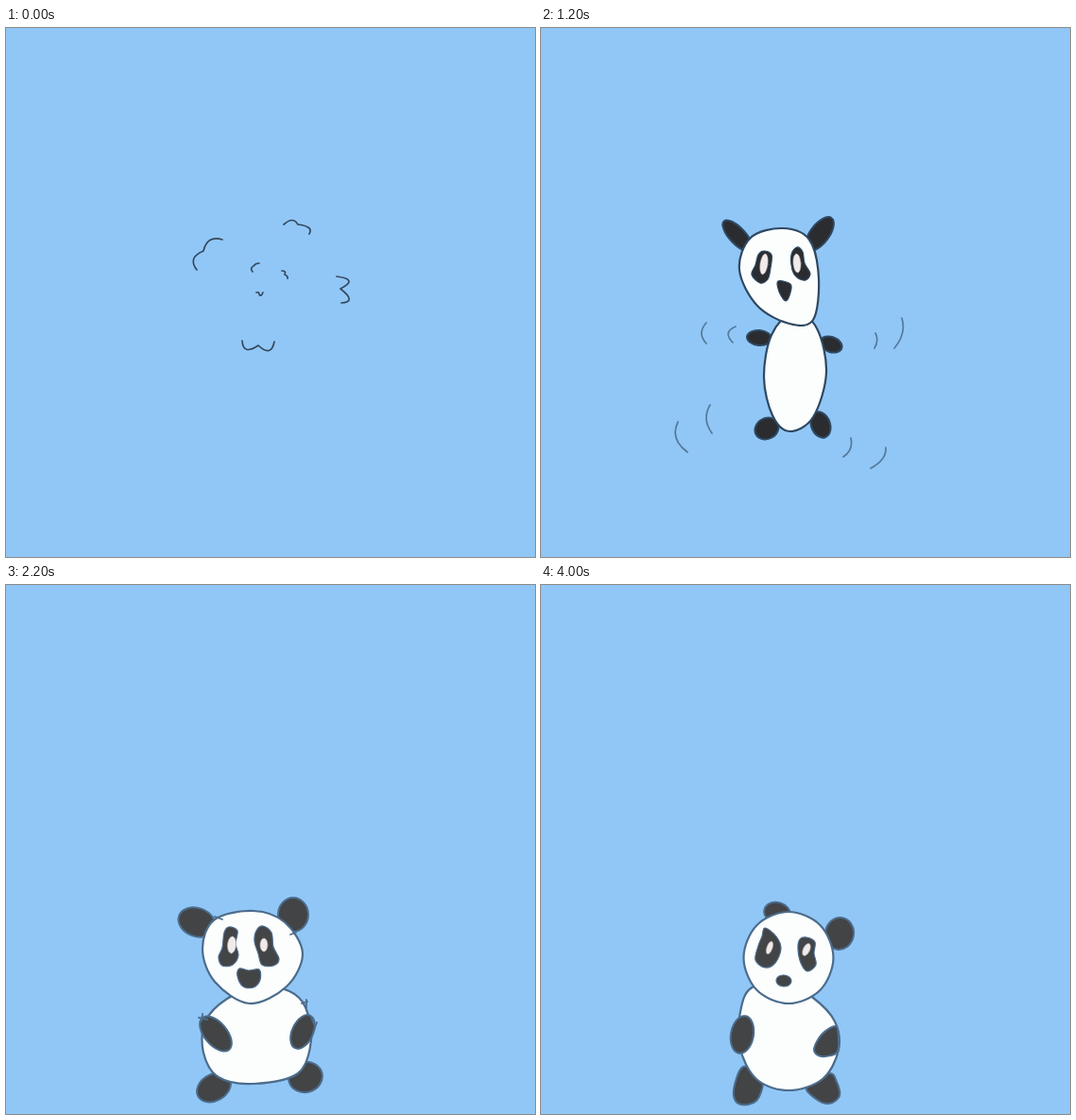
An HTML page that plays this animation: 560x560 px, repeating every 5400 ms.

```html
<!DOCTYPE html>
<html lang="en">
<head>
<meta charset="utf-8">
<title>Falling panda</title>
<style>
  html, body { margin: 0; width: 100%; height: 100%; overflow: hidden; background: #91c7f6; }
  svg { display: block; width: 100vw; height: 100vh; }
  path { stroke-linecap: round; stroke-linejoin: round; }
</style>
</head>
<body>
<svg id="stage" viewBox="0 0 560 560"></svg>
<script>
const LOOP = 5400;
const stage = document.getElementById('stage');

// Parts with five values are ellipses (cx, cy, rx, ry, degrees); others are outline points.
const floating = {
  ink: [46, 72, 98], dark: [44, 45, 48],
  earL: [204, 129, 17, 20, -25], earR: [301, 127, 20, 16, -30],
  armL: [214, 238, 19, 11, 12], armR: [319, 228, 17, 11, -55],
  footL: [234, 317, 14, 12, -40], footR: [303, 322, 15, 16, 0],
  body: [268,205, 303,214, 316,255, 302,305, 268,332, 236,309, 224,265, 235,226],
  head: [255,122, 294,134, 316,172, 301,207, 258,223, 213,209, 195,172, 213,137],
  eyeL: [231,142, 239,150, 237,165, 236,178, 227,183, 215,176, 217,161, 223,148],
  eyeR: [268,140, 277,144, 281,157, 291,168, 285,178, 273,176, 265,165, 262,148],
  pupilL: [229, 161, 4, 9, 0], pupilR: [274, 158, 4, 8, -5],
  nose: [250,182, 267,182, 265,191, 254,193, 249,187],
  marks: 'M215 140Q224 125 241 122'
};
const falling = {
  ink: [46, 72, 98], dark: [43, 44, 47],
  earL: [208, 220, 21, 8.5, 47], earR: [295, 218, 21, 10, -53],
  armL: [231, 328, 13, 8, 5], armR: [307, 335, 12, 8, 20],
  footL: [239, 424, 13, 11, -30], footR: [296, 420, 10, 14, -20],
  body: [268,300, 292,318, 302,365, 288,412, 263,427, 245,410, 236,370, 244,325],
  head: [256,212, 284,224, 294,265, 288,309, 263,313, 229,294, 210,256, 222,222],
  eyeL: [236,236, 244,240, 243,254, 240,266, 232,270, 223,261, 227,251, 230,240],
  eyeR: [271,232, 277,237, 279,249, 285,260, 280,267, 271,264, 266,256, 265,240],
  pupilL: [236, 250, 4, 11, 8], pupilR: [271, 249, 4, 10, -4],
  nose: [251,268, 264,271, 264,280, 259,289, 252,279]
};
const stretched = {
  ink: [72, 102, 133], dark: [67, 68, 70],
  earL: [224, 279, 21, 9, 58], earR: [290, 284, 21, 10, -62],
  armL: [228, 415, 14, 11, 10], armR: [309, 408, 17, 14, -50],
  footL: [223, 492, 13, 10, 5], footR: [302, 498, 13, 14, 0],
  body: [268,388, 291,404, 302,450, 290,508, 257,526, 237,505, 232,460, 242,405],
  head: [260,285, 289,306, 298,345, 290,381, 259,395, 230,380, 222,340, 235,302],
  eyeL: [242,308, 251,312, 253,325, 248,342, 240,346, 234,338, 236,324, 238,312],
  eyeR: [270,309, 276,315, 280,327, 285,336, 278,343, 268,340, 264,327, 265,312],
  pupilL: [243, 322, 3, 6, 0], pupilR: [272, 324, 3, 7, -5],
  nose: [252,348, 268,349, 268,360, 263,370, 252,361]
};
const sitting = {
  ink: [76, 108, 140], dark: [67, 68, 70], armsInFront: true,
  earL: [202, 357, 20, 15, 20], earR: [304, 349, 16, 18, 0],
  armL: [222, 475, 22, 12, 50], armR: [314, 473, 19, 11, -65],
  footL: [220, 532, 19, 14, -30], footR: [317, 521, 18, 16, -15],
  body: [268,425, 300,430, 317,447, 323,482, 309,517, 262,528, 225,521, 209,495, 211,462, 234,438],
  head: [262,345, 295,357, 314,390, 297,425, 258,443, 221,420, 208,385, 221,354],
  eyeL: [236,362, 245,366, 243,380, 246,392, 240,402, 229,403, 225,394, 229,384, 231,368],
  eyeR: [272,361, 281,368, 283,383, 289,396, 283,403, 271,402, 267,390, 263,377, 265,366],
  pupilL: [239, 381, 4.5, 9, 5], pupilR: [273, 381, 4, 7, 0],
  nose: [247,406, 257,408, 268,407, 269,418, 262,426, 251,425, 245,414]
};
const ticks = 'M313 443l6-2M318 439v8M323 457l3 8M329 463l-4 11M204 458l9 2M208 454l-1 8M221 351l8 3M301 370l6-2';
const turned = {
  ink: [76, 108, 140], dark: [67, 68, 70], armsInFront: true,
  earL: [250, 347, 14, 11, 15], earR: [316, 369, 15, 17, 10],
  armL: [213, 476, 12, 20, 10], armR: [312,467, 315,480, 313,495, 297,499, 289,492, 297,476],
  footL: [214,510, 228,513, 235,527, 228,546, 212,550, 204,541, 207,522],
  footR: [305,517, 313,526, 316,541, 305,549, 291,544, 281,531],
  body: [255,420, 288,437, 311,462, 315,492, 298,523, 262,535, 228,523, 210,488, 211,452, 222,427],
  head: [262, 394.5, 47.5, 48.5, 0],
  eyeL: [237,363, 249,372, 254,385, 248,400, 237,405, 227,397, 230,382, 234,372],
  eyeR: [281,373, 290,378, 289,390, 291,402, 282,409, 275,400, 272,385, 274,375],
  pupilL: [242, 384, 3, 7, 20], pupilR: [281, 386, 3.5, 7, 25],
  nose: [257, 419, 8, 6, 5]
};

// Each puff is two arcs: start, bend, cusp, bend, end.
const nearPuffs = [
  [202,256, 192,243, 209,236, 213,219, 229,224], [294,208, 304,199, 309,208, 326,210, 321,218],
  [350,263, 374,266, 354,276, 372,290, 355,291], [250,331, 251,347, 267,336, 281,349, 284,332],
  [261,258, 258,254, 262,252, 264,249, 268,249], [292,257, 297,257, 295,261, 299,263, 298,265],
  [265,280, 268,279, 268,282, 270,285, 272,280]
];
const farPuffs = [
  [256,56, 280,23, 325,54, 400,43, 415,87], [94,123, 22,127, 42,182, 3,215, 29,267],
  [493,181, 548,190, 519,230, 563,268, 530,294], [46,435, -5,499, 52,507, 57,550, 126,545],
  [532,438, 534,500, 491,510, 507,551, 407,540], [114,209, 105,189, 132,184, 135,173, 145,173],
  [393,195, 420,192, 415,214, 434,228, 424,246], [82,310, 78,330, 87,332, 82,350, 108,362],
  [151,315, 150,320, 154,321, 154,328, 164,334], [354,298, 362,297, 363,308, 367,312, 365,318],
  [450,349, 464,351, 457,368, 465,383, 458,392], [218,419, 226,425, 231,422, 247,431, 252,424],
  [357,452, 361,467, 346,465, 339,463, 332,469], [148,469, 158,478, 170,476, 185,497, 209,483]
];
const nearBox = [198, 203, 363, 341], farBox = [17, 36, 546, 547];
const sittingBox = [182, 331, 335, 548], turnedBox = [199, 336, 331, 550];
const speedLines = 'M175 312Q165 323 175 334M206 316Q192 322 203 333M145 417Q136 435 155 449' +
  'M179 399Q170 414 181 429M382 307Q387 324 374 339M354 323Q358 331 353 339' +
  'M328 434Q331 447 320 454M365 444Q366 457 349 466';

const mix = (a, b, k) => a + (b - a) * k;
const mapPoints = (list, from, to) => list.map((v, i) => {
  const a = i % 2, b = a + 2;
  return mix(to[a], to[b], (v - from[a]) / (from[b] - from[a]));
});

function outline(part) {
  if (part.length !== 5) return part;
  const [cx, cy, rx, ry, deg] = part, turn = deg * Math.PI / 180, points = [];
  for (let i = 0; i < 8; i++) {
    const a = i * Math.PI / 4, x = rx * Math.cos(a), y = ry * Math.sin(a);
    points.push(cx + x * Math.cos(turn) - y * Math.sin(turn), cy + x * Math.sin(turn) + y * Math.cos(turn));
  }
  return points;
}

function editPose(pose, edit) {
  const result = { ...pose };
  for (const key in pose)
    if (Array.isArray(pose[key])) result[key] = edit(key, pose[key]);
  return result;
}
const isColour = key => key === 'ink' || key === 'dark';
const fit = (pose, from, to) => ({
  ...editPose(pose, (key, part) => isColour(key) ? part : mapPoints(outline(part), from, to)),
  marks: ''
});
const between = (a, b) => ({
  ...editPose(a, (key, part) => part.map((v, i) => mix(v, b[key][i], .5))), marks: ''
});
const grow = s => fit(floating, [0, 0, 1, 1], [257 * (1 - s), 235 * (1 - s), 257 * (1 - s) + s, 235 * (1 - s) + s]);

function blob(points) {
  const n = points.length / 2, at = i => [points[(i + n) % n * 2], points[(i + n) % n * 2 + 1]];
  let d = 'M' + at(0).map(v => v.toFixed(1));
  for (let i = 0; i < n; i++) {
    const [p, a, b, q] = [at(i - 1), at(i), at(i + 1), at(i + 2)];
    const c1 = a.map((v, k) => v + (b[k] - p[k]) / 6), c2 = b.map((v, k) => v - (q[k] - a[k]) / 6);
    d += 'C' + [...c1, ...c2, ...b].map(v => v.toFixed(1));
  }
  return d + 'Z';
}
const path = (d, fill, stroke, width) =>
  `<path d="${d}" fill="${fill}" stroke="${stroke}" stroke-width="${width}"/>`;
const line = (d, colour, width) => path(d, 'none', colour, width);

function drawPanda(pose) {
  const ink = `rgb(${pose.ink.map(Math.round)})`, dark = `rgb(${pose.dark.map(Math.round)})`;
  const draw = (keys, fill, stroke, width) =>
    keys.split(' ').map(key => path(blob(outline(pose[key])), fill, stroke, width)).join('');
  const arms = draw('armL armR', dark, ink, 2);
  return draw('earL earR footL footR', dark, ink, 2) +
    (pose.armsInFront ? '' : arms) +
    draw('body', '#fbfefd', ink, 2.2) +
    (pose.armsInFront ? arms : '') +
    draw('head', '#fbfefd', ink, 2.2) +
    draw('eyeL eyeR nose', dark, ink, 1.2) +
    draw('pupilL pupilR', '#f0ebea', '#a9a4a4', .6) +
    (pose.marks ? line(pose.marks, ink, 1.8) : '');
}

const drawPuffs = (puffs, from, to) => puffs.map(puff => {
  const p = mapPoints(puff, from, to).map(v => v.toFixed(1));
  return line(`M${p.slice(0, 2)}Q${p.slice(2, 6)}Q${p.slice(6)}`, '#34495e', 1.7);
}).join('');

const settled = { ...sitting, marks: ticks };
const glancing = { ...settled, pupilL: [239, 377, 3, 10, 3], pupilR: [272, 377, 4.5, 9, 5] };
const scenes = [
  [0, drawPuffs(nearPuffs, nearBox, nearBox)],
  [200, drawPuffs(nearPuffs, nearBox, [103, 135, 396, 393]) + drawPanda(grow(.3))],
  [400, drawPuffs(farPuffs, farBox, [57, 105, 458, 450]) + drawPanda(grow(.55))],
  [600, drawPuffs(farPuffs, farBox, [8, 58, 494, 513]) + drawPanda(grow(.8))],
  [800, drawPuffs(farPuffs, farBox, farBox) + drawPanda(floating)],
  [1000, drawPuffs(farPuffs.slice(0, 5), farBox, [26, 25, 556, 550]) + drawPanda(between(floating, falling))],
  [1200, line(speedLines, '#55799b', 1.7) + drawPanda(falling)],
  [1400, drawPanda(between(falling, stretched))],
  [1600, drawPanda(stretched)],
  [1800, drawPanda(fit(sitting, sittingBox, [173, 363, 381, 530]))],
  [2000, drawPanda(fit(sitting, sittingBox, [183, 364, 340, 542]))],
  [2200, drawPanda(settled)],
  [2800, drawPanda(turned)],
  [3000, drawPanda(fit(turned, turnedBox, [338, 332, 206, 553]))],
  [3400, drawPanda(glancing)],
  [3600, drawPanda(fit(turned, turnedBox, [322, 329, 190, 551]))],
  [4000, drawPanda(turned)]
];

let shown;
const start = performance.now();
function render(now) {
  const t = Math.max(0, now - start) % LOOP;
  const scene = scenes.filter(([from]) => from <= t).pop();
  if (scene !== shown) stage.innerHTML = scene[1];
  shown = scene;
  requestAnimationFrame(render);
}
render(start);
</script>
</body>
</html>
```
